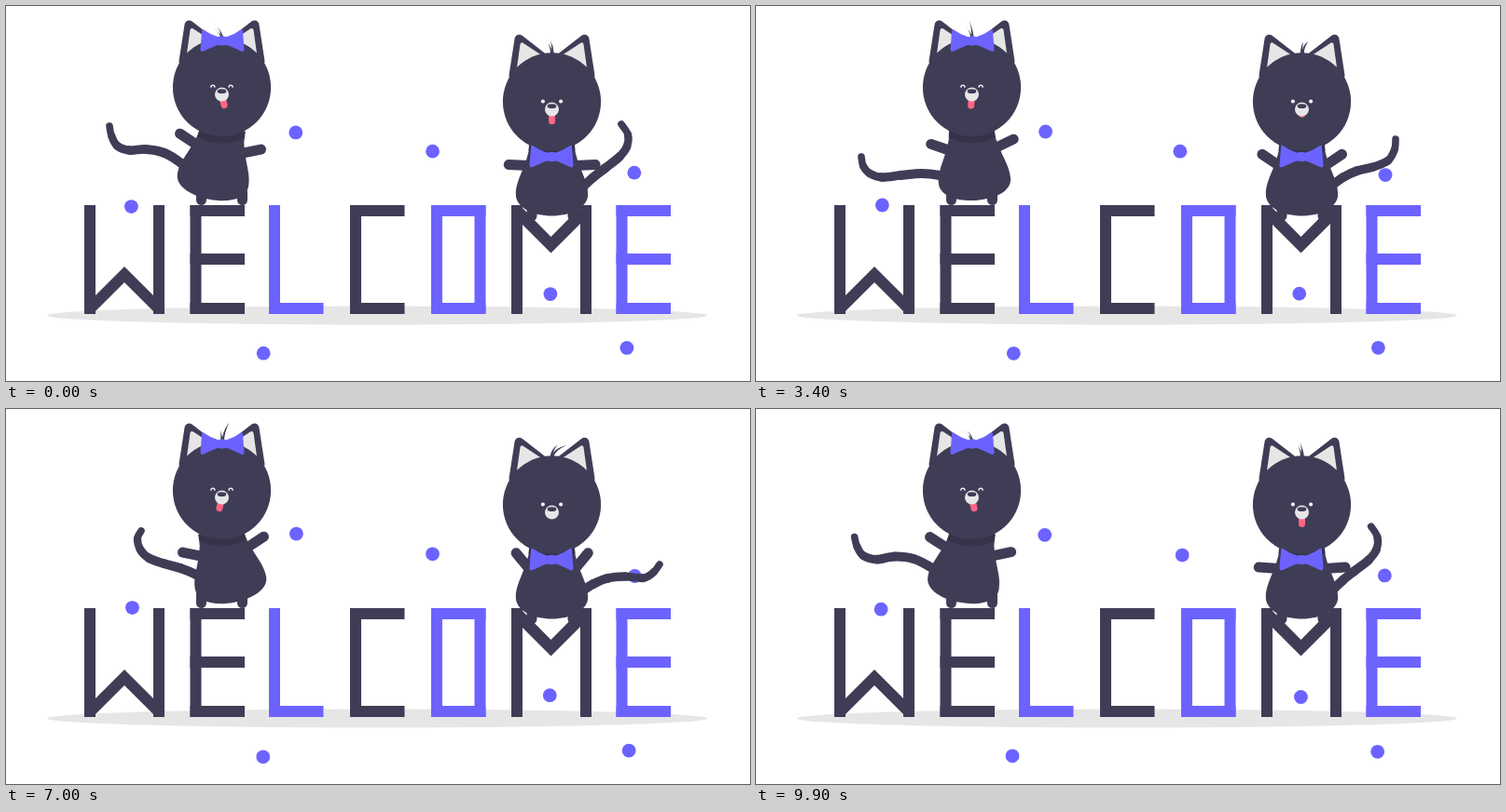
Recreate the animation shown at these times as an HTML page with a canvas. Size 798 px wide and 403 px high, loop 10000 ms.

```html
<!DOCTYPE html>
<html lang="en">
<head>
<meta charset="utf-8">
<title>Welcome cats</title>
<style>
html, body { margin: 0; width: 100%; height: 100%; overflow: hidden; background: #fff; }
canvas { display: block; width: 798px; height: 403px; }
</style>
</head>
<body>
<canvas id="stage"></canvas>
<script>
const W = 798, H = 403, LOOP = 10000, STEP = 100, SWAY = 2000;
const DARK = '#3f3d56', SHADE = '#353349', BLUE = '#6c63ff', GREY = '#e6e6e6', PINK = '#ff6584';
const TAU = Math.PI * 2;

const canvas = document.getElementById('stage');
const ctx = canvas.getContext('2d');
const ratio = window.devicePixelRatio || 1;
canvas.width = Math.round(W * ratio);
canvas.height = Math.round(H * ratio);

// Tail centre lines from tip to root, at four points of the sway cycle
const TAIL_LEFT = [
  [111, 129, 113, 139, 119, 150, 132, 155, 150, 154, 170, 158, 188, 169, 200, 180],
  [125, 118, 126, 128, 131, 141, 140, 148, 156, 153, 175, 159, 191, 171, 203, 182],
  [145, 131, 141, 139, 144, 151, 153, 160, 169, 166, 187, 171, 204, 178, 214, 184],
  [113, 162, 115, 172, 122, 180, 135, 184, 155, 182, 177, 180, 197, 182, 208, 186]
];
const TAIL_RIGHT = [
  [660, 127, 667, 138, 666, 151, 658, 162, 643, 174, 630, 184, 616, 197],
  [669, 130, 675, 141, 672, 154, 662, 165, 647, 175, 633, 182, 616, 195],
  [701, 167, 695, 175, 684, 181.5, 664, 180, 645, 182, 630, 188, 616, 197],
  [686, 143, 685, 154, 678, 166, 662, 173, 645, 177, 630, 184, 616, 194]
];

const DOTS = [
  [310.8, 134.9], [456.2, 156.2], [674.2, 180.3], [134.3, 215],
  [583.5, 309], [667.4, 367.7], [276.3, 374.3]
];

function disc(x, y, rx, color, ry = rx) {
  ctx.fillStyle = color;
  ctx.beginPath();
  ctx.ellipse(x, y, rx, ry, 0, 0, TAU);
  ctx.fill();
}

function rect(x, y, w, h) {
  ctx.fillRect(x, y, w, h);
}

function poly(points, color, round = 0) {
  ctx.beginPath();
  points.forEach(([x, y]) => ctx.lineTo(x, y));
  ctx.closePath();
  ctx.fillStyle = ctx.strokeStyle = color;
  ctx.fill();
  if (round) {
    ctx.lineWidth = round;
    ctx.lineJoin = 'round';
    ctx.stroke();
  }
}

function limb(x1, y1, x2, y2, width, color) {
  ctx.strokeStyle = color;
  ctx.lineWidth = width;
  ctx.lineCap = 'round';
  ctx.beginPath();
  ctx.moveTo(x1, y1);
  ctx.lineTo(x2, y2);
  ctx.stroke();
}

function letters() {
  const top = 214, tall = 117, bar = 12, wide = 58.5, base = top + tall - bar;
  const post = x => rect(x, top, bar, tall);
  const beam = (x, y) => rect(x, y, wide, bar);
  const chevron = (x, y, dir) => poly([
    [x - 31, y + 31 * dir], [x, y], [x + 31, y + 31 * dir],
    [x + 34, y + 51 * dir], [x, y + 17 * dir], [x - 34, y + 51 * dir]
  ], DARK);
  const letterE = x => {
    post(x);
    [top, 266, base].forEach(y => beam(x, y));
  };

  ctx.fillStyle = DARK;
  post(84);
  post(158);
  chevron(127, 280, 1);
  letterE(197.5);
  post(369);
  beam(369, top);
  beam(369, base);
  post(542);
  post(616);
  poly([[552, 215], [584.5, 248], [617, 215], [617, 233], [584.5, 265.5], [552, 233]], DARK);

  ctx.fillStyle = BLUE;
  post(282);
  beam(282, base);
  post(456);
  post(502.5);
  beam(456, top);
  beam(456, base);
  letterE(654.5);
}

function dots(t) {
  const a = t / LOOP * TAU;
  DOTS.forEach(([x, y], i) => {
    const dx = Math.sin(a * (9 + i) + i * 2.1) + 0.6 * Math.sin(a * (17 - i) + i);
    const dy = Math.cos(a * (8 + i) + i * 1.7) + 0.5 * Math.sin(a * (15 - i) + i * 3);
    disc(x + dx, y + dy, 7.4, BLUE);
  });
}

// Smooth cyclic curve through the four tail poses
function blend(poses, a) {
  const c = Math.cos(a), s = Math.sin(a);
  return poses[0].map((p, i) => {
    const q = poses[2][i], mid = (p + q) / 2, amp = (p - q) / 2;
    const r1 = poses[1][i] - mid - 0.809 * amp;
    const r2 = poses[3][i] - mid + 0.309 * amp;
    const k2 = (r2 + 1.618 * r1) / 1.462;
    const k1 = (r1 - 0.345 * k2) / 0.588;
    return mid + amp * c + k1 * s + k2 * s * s;
  });
}

function tail(poses, a) {
  const v = blend(poses, a), n = v.length / 2;
  const at = i => {
    const k = Math.max(0, Math.min(n - 1, i)) * 2;
    return [v[k], v[k + 1]];
  };
  ctx.strokeStyle = DARK;
  ctx.lineCap = 'round';
  for (let i = 0; i < n - 1; i++) {
    const [p, q, r, s] = [at(i - 1), at(i), at(i + 1), at(i + 2)];
    ctx.lineWidth = Math.min(10, 7.6 + i * 0.7);
    ctx.beginPath();
    ctx.moveTo(...q);
    ctx.bezierCurveTo(
      q[0] + (r[0] - p[0]) / 6, q[1] + (r[1] - p[1]) / 6,
      r[0] - (s[0] - q[0]) / 6, r[1] - (s[1] - q[1]) / 6, ...r);
    ctx.stroke();
  }
}

function bell(depth) {
  const p = new Path2D();
  p.moveTo(-24, -8);
  p.lineTo(-25, 4);
  p.bezierCurveTo(-30, 25, -38.7, 35, -38.7, 50);
  p.bezierCurveTo(-38.7, 64, -20, depth, 0, depth);
  p.bezierCurveTo(20, depth, 38.7, 64, 38.7, 50);
  p.bezierCurveTo(38.7, 35, 30, 25, 25, 4);
  p.lineTo(24, -8);
  p.closePath();
  return p;
}

function torso(x, y, turn, depth) {
  const shape = bell(depth);
  ctx.save();
  ctx.translate(x, y);
  ctx.rotate(turn);
  ctx.fillStyle = DARK;
  ctx.fill(shape);
  ctx.clip(shape);
  ctx.rotate(-turn);
  disc(0, -43, 52.5, SHADE);
  ctx.restore();
}

function hair(x, y, tipX, tipY) {
  ctx.fillStyle = DARK;
  ctx.beginPath();
  ctx.moveTo(x - 1.3, y);
  ctx.quadraticCurveTo(x - 0.8, (y + tipY) / 2 - 2, tipX, tipY);
  ctx.quadraticCurveTo(x + 1, (y + tipY) / 2, x + 1.3, y);
  ctx.fill();
}

function head(x, y) {
  [-1, 1].forEach(side => {
    const at = pts => pts.map(([dx, dy]) => [x + dx * side, y + dy]);
    poly(at([[35, -67], [41, -28], [8, -46]]), DARK, 10);
    poly(at([[32, -61.5], [35.5, -36.5], [13, -49]]), GREY, 4);
  });
  disc(x, y, 52.6, DARK);
}

function muzzle(x, y) {
  disc(x, y, 7.5, GREY);
  disc(x, y - 3.3, 4.8, DARK, 2.4);
}

function bow(x, y) {
  ctx.fillStyle = BLUE;
  [-1, 1].forEach(side => {
    ctx.beginPath();
    ctx.moveTo(x, y - 4);
    ctx.lineTo(x + 5 * side, y - 4.5);
    ctx.quadraticCurveTo(x + 13 * side, y - 7, x + 20 * side, y - 12);
    ctx.quadraticCurveTo(x + 22 * side, y - 13, x + 22 * side, y - 10);
    ctx.lineTo(x + 23.5 * side, y + 9);
    ctx.quadraticCurveTo(x + 23.5 * side, y + 12.5, x + 20 * side, y + 11);
    ctx.quadraticCurveTo(x + 12 * side, y + 7, x + 5 * side, y + 4.5);
    ctx.lineTo(x, y + 4.5);
    ctx.fill();
  });
  ctx.beginPath();
  ctx.roundRect(x - 4.5, y - 5, 9, 10, 3);
  ctx.fill();
}

function girl(a) {
  const x = 231.5, y = 87.5, c = Math.cos(a), s = Math.sin(a);
  const turn = 11 * Math.PI / 180 * c;
  tail(TAIL_LEFT, a);
  ctx.save();
  ctx.translate(x, 138);
  ctx.rotate(turn);
  [-1, 1].forEach(side => limb(44.3 * side, 7.8, 22 * side, 17, 11, DARK));
  ctx.restore();
  torso(x, 138, turn, 71);
  [209.5, 253.5].forEach(fx => limb(fx, 200, fx, 208.5, 11, DARK));

  hair(x, y - 50, x - 6 - 4.5 * c + 2 * s, y - 65);
  hair(x + 1, y - 50, x - 0.5 - 8.5 * c + 5 * s, y - 71 + 2 * c);
  head(x, y);
  bow(x + 0.5, 37.5);

  ctx.strokeStyle = '#fff';
  ctx.lineWidth = 1.3;
  [-9.6, 9.6].forEach(dx => {
    ctx.beginPath();
    ctx.arc(x + dx, 87.2, 2, Math.PI, TAU);
    ctx.stroke();
  });
  ctx.save();
  ctx.translate(x, 96);
  ctx.rotate(-0.24 * c);
  limb(0, 0, 0, 11, 7, PINK);
  ctx.restore();
  muzzle(x, 95);
}

function boy(a) {
  const x = 585.5, y = 102.8, c = Math.cos(a), s = Math.sin(a);
  const lift = (26.6 - 23.9 * c) * Math.PI / 180;
  tail(TAIL_RIGHT, a);
  [-1, 1].forEach(side => {
    const sx = x + 0.2 + 24.8 * side;
    limb(sx, 171.5, sx + 21.7 * side * Math.cos(lift), 171.5 - 21.7 * Math.sin(lift), 11, DARK);
  });
  torso(x, 152.5, 0, 73);
  [564, 608].forEach(fx => limb(fx, 220, fx, 225.5, 11, DARK));

  hair(x - 0.5, y - 51, x + 0.5 - 5.5 * c + s, y - 64);
  hair(x + 1, y - 51, x + 7 - 9 * c + 3 * s, y - 65.5 + 1.5 * -c);
  head(x, y);
  bow(x - 0.5, 162);

  [-9.6, 9.6].forEach(dx => disc(x + dx, 102.6, 2, '#fff'));
  limb(x, 112, x, 118 + 5.7 * c, 7, PINK);
  muzzle(x, 111);
}

function draw(t) {
  const a = (t % SWAY) / SWAY * TAU;
  ctx.setTransform(ratio, 0, 0, ratio, 0, 0);
  ctx.fillStyle = '#fff';
  rect(0, 0, W, H);
  disc(398, 332.5, 354, GREY, 10);
  letters();
  dots(t);
  girl(a);
  boy(a);
}

const start = performance.now();
function tick() {
  const t = (performance.now() - start) % LOOP;
  draw(Math.floor(t / STEP) * STEP);
  requestAnimationFrame(tick);
}
tick();
</script>
</body>
</html>
```
